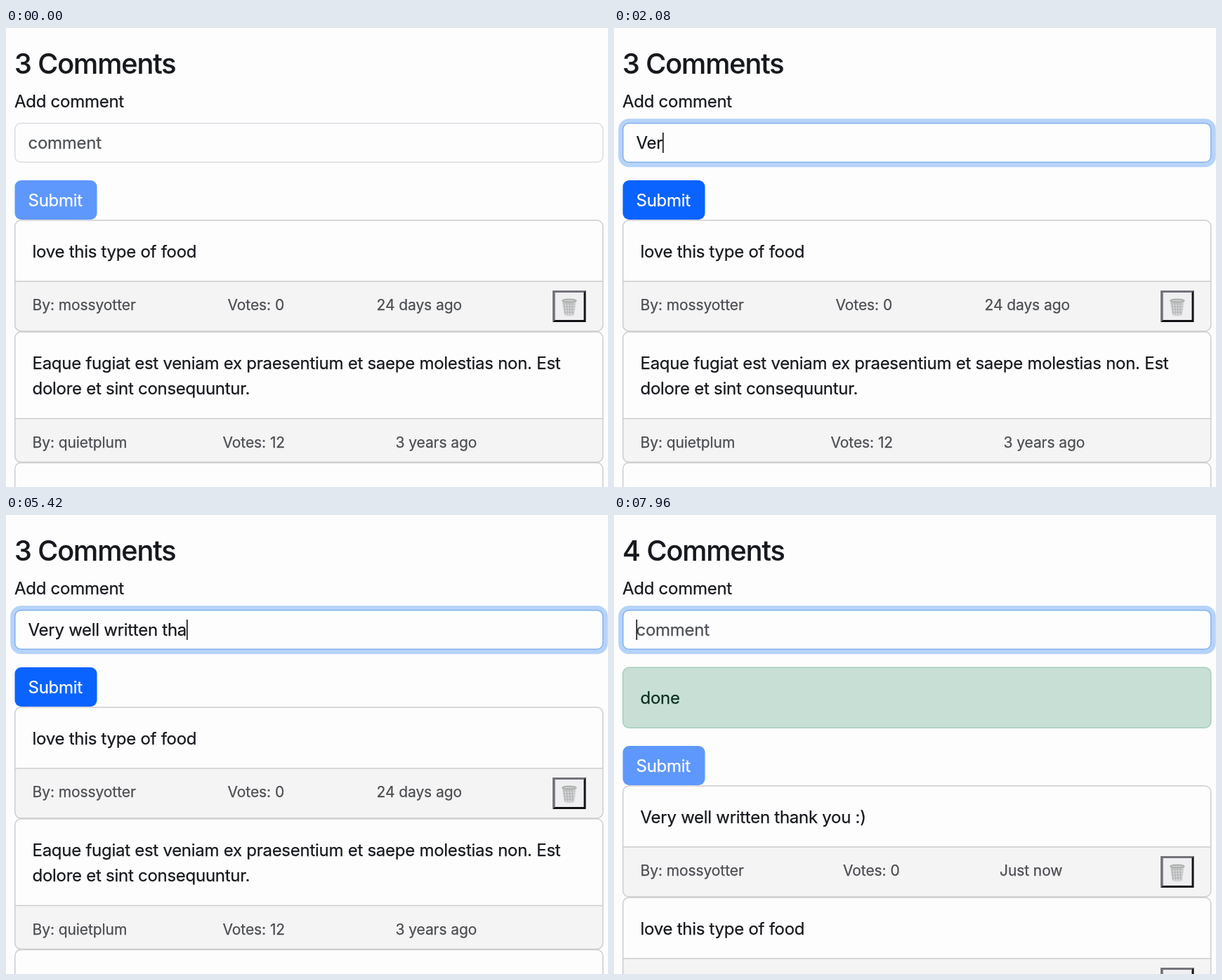
Write an HTML page that moves like this. It is 857 by 654 pixels and loops after 8 s.

```html
<!DOCTYPE html>
<html lang="en">
<head>
<meta charset="utf-8">
<title>Comments</title>
<style>
  html, body { margin: 0; width: 100%; height: 100%; overflow: hidden; background: #fdfdfd; }
  svg { display: block; width: 857px; height: 654px; }
  text {
    font: 24px Inter, "Open Sans", sans-serif; letter-spacing: -.27px; white-space: pre;
    color: #16181d; fill: currentColor; stroke: currentColor; stroke-width: .25;
  }
  .title { font-size: 39.5px; font-weight: 500; letter-spacing: -1px; }
  .meta { font-size: 21px; letter-spacing: -.08px; color: #4b4d52; }
  .placeholder { color: #4d5054; }
  .label { color: #fff; }
  .outline { fill: none; stroke: #cdcdd1; stroke-width: 1.5; }
  .footer { fill: #f4f4f4; }
</style>
</head>
<body>
<svg viewBox="0 0 857 654">
  <text id="title" class="title" x="12" y="65">3 Comments</text>
  <text x="12" y="113">Add comment</text>

  <rect id="ring" x="9.5" y="132.5" width="844" height="62.5" rx="12" fill="none" stroke="#b6d3fa" stroke-width="6.5"/>
  <rect id="field" x="12.75" y="135.75" width="837" height="55.5" rx="8.5" fill="#fdfdfd" stroke-width="1.5"/>
  <text id="value" x="31.5" y="172" xml:space="preserve"></text>
  <rect id="caret" y="149" width="1.6" height="29" fill="#111"/>

  <g id="alert">
    <rect id="alertBox" x="12.75" y="217.25" width="837" height="86" rx="8.5" stroke-width="1.5"/>
    <text id="alertText" x="37.5" y="269"></text>
  </g>

  <g id="lower">
    <g id="submit">
      <rect x="12.5" y="217" width="117" height="56" rx="9" fill="#0a63fe"/>
      <text class="label" x="31.5" y="254">Submit</text>
    </g>
    <g id="newCard"></g>
    <g id="oldCards"></g>
  </g>
</svg>

<script>
const $ = id => document.getElementById(id);
const clamp = x => Math.max(0, Math.min(1, x));
const smooth = x => x * x * (3 - 2 * x);

const LOOP = 8000, FOCUS = 350, FIRST_KEY = 1650, FASTER = 4422, SUBMIT = 6830, DONE = 7300;
const MESSAGE = "Very well written thank you :)";
const ALERT_SHIFT = 112, CARD_STRIDE = 159, LIST_TOP = 273.5;
const LAST_KEY = FASTER + 15 * 147;

function binButton(y) {
  const mesh = [0, 1, 2, 3].map(i =>
    `M${794 + i * 4} ${y + 17}l${2 - i * .5} 17M${793 + i * .5} ${y + 19 + i * 4}h${17 - i}`).join("");
  return `
    <rect x="778.5" y="${y}" width="47" height="45" fill="#111216"/>
    <path d="M778.5 ${y}h47l-3 3h-41v39l-3 3z" fill="#73747b"/>
    <rect x="781.5" y="${y + 3}" width="41" height="39" fill="#efeff2"/>
    <path d="M791.5 ${y + 14}l3.3 21q7 3 14 0l3.2-21z" fill="#d3d4d4"/>
    <path d="${mesh}" fill="none" stroke="#acaeb0" stroke-width=".9"/>
    <ellipse cx="801.8" cy="${y + 14.5}" rx="10.3" ry="2.3" fill="#c3c5c3" stroke="#989a99"/>`;
}

function card({ y, height, divider, lines, meta, metaY, bin }) {
  const body = lines.map((line, i) =>
    `<text x="37.5" y="${y + 53.5 + i * 36}">${line}</text>`).join("");
  const footer = meta.map(([x, label]) =>
    `<text class="meta" x="${x}" y="${y + metaY}">${label}</text>`).join("");
  return `
    <path class="footer" d="M12.75 ${y + divider}h837v${height - divider - 9}q0 9-9 9h-819q-9 0-9-9z"/>
    <path class="outline" d="M12.75 ${y + divider}h837"/>
    <rect class="outline" x="12.75" y="${y + .5}" width="837" height="${height - 1}" rx="8.5"/>
    ${body}${footer}${bin ? binButton(y + 100.5) : ""}`;
}

const shortCard = (text, meta) => card({
  y: LIST_TOP, height: 159, divider: 87.5, lines: [text], meta, metaY: 128.5, bin: true
});

$("newCard").innerHTML = shortCard(MESSAGE,
  [[37.5, "By: mossyotter"], [326, "Votes: 0"], [549, "Just now"]]);

$("oldCards").innerHTML =
  shortCard("love this type of food",
    [[37.5, "By: mossyotter"], [315.5, "Votes: 0"], [527.5, "24 days ago"]]) +
  card({
    y: LIST_TOP + CARD_STRIDE, height: 186.5, divider: 124, metaY: 165,
    lines: ["Eaque fugiat est veniam ex praesentium et saepe molestias non. Est",
            "dolore et sint consequuntur."],
    meta: [[37.5, "By: quietplum"], [308.5, "Votes: 12"], [554.5, "3 years ago"]]
  }) +
  card({ y: 619, height: 160, divider: 88, lines: [], meta: [] });

function typedCount(t) {
  if (t < FIRST_KEY || t >= DONE) return 0;
  const count = t < FASTER ? 1 + (t - FIRST_KEY) / 198 : 15 + (t - FASTER) / 147;
  return Math.min(MESSAGE.length, Math.floor(count + 1e-6));
}

function caretVisible(t) {
  if (t < FOCUS) return false;
  if (t >= FIRST_KEY && t < LAST_KEY) return true;
  const since = t - (t < FIRST_KEY ? FOCUS : LAST_KEY);
  return since % 1000 < 500;
}

const show = (id, visible) => $(id).setAttribute("visibility", visible ? "visible" : "hidden");
const shift = (id, y) => $(id).setAttribute("transform", `translate(0 ${y})`);

function draw(t) {
  const submitted = t >= SUBMIT, done = t >= DONE;
  const typed = MESSAGE.slice(0, typedCount(t));
  const focus = smooth(clamp((t - FOCUS) / 150));

  $("title").textContent = `${done ? 4 : 3} Comments`;
  $("ring").setAttribute("opacity", focus);
  const border = [[218, 130], [221, 176], [226, 234]].map(([from, to]) => from + (to - from) * focus);
  $("field").setAttribute("stroke", `rgb(${border})`);

  $("value").textContent = typed || "comment";
  $("value").setAttribute("class", typed ? "" : "placeholder");
  $("caret").setAttribute("x", 31.5 + (typed ? $("value").getComputedTextLength() : 0));
  show("caret", caretVisible(t));

  show("alert", submitted);
  $("alertBox").setAttribute("fill", done ? "#c8dfd6" : "#c3f1fb");
  $("alertBox").setAttribute("stroke", done ? "#a3cfbb" : "#9ae6f5");
  $("alertText").textContent = done ? "done" : "adding comment...";
  $("alertText").style.color = done ? "#0a3020" : "#064b59";

  $("submit").setAttribute("opacity", typed && !submitted ? 1 : .65);
  shift("lower", submitted ? ALERT_SHIFT : 0);
  show("newCard", done);
  shift("oldCards", done ? CARD_STRIDE : 0);
}

let start;
function tick(now) {
  start ??= now;
  draw((now - start) % LOOP);
  requestAnimationFrame(tick);
}
draw(0);
requestAnimationFrame(tick);
</script>
</body>
</html>
```
